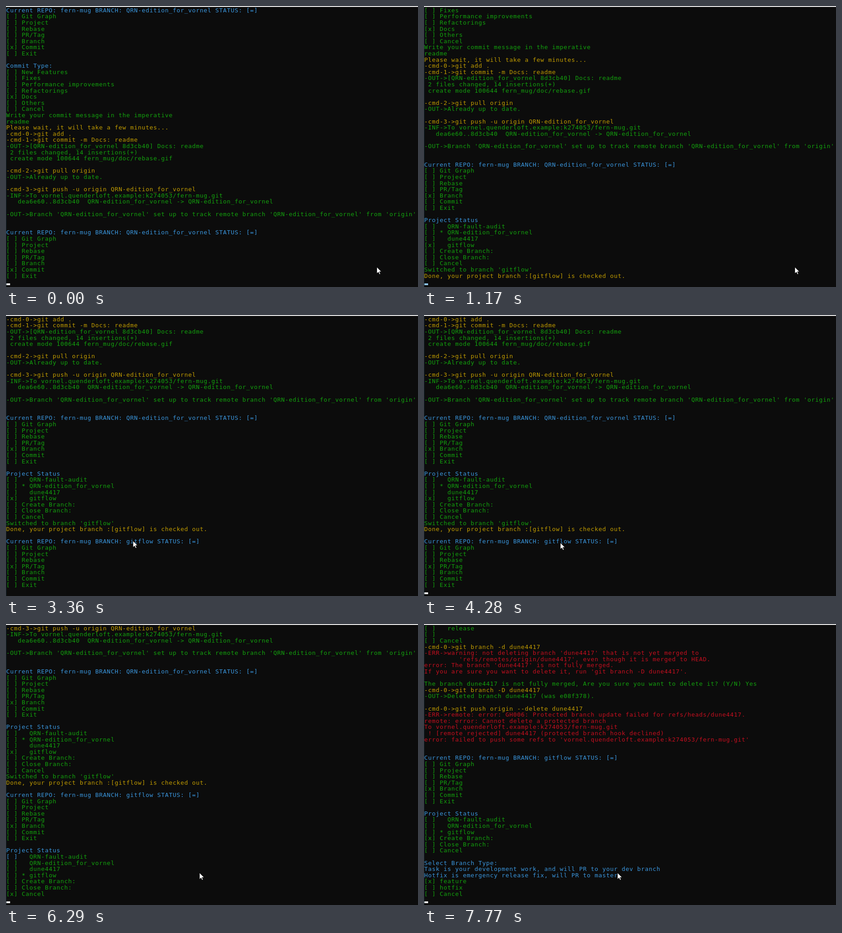
An HTML page for the animation above (8 s loop, 905x619 px).

```html
<!DOCTYPE html>
<html lang="en">
<head>
<meta charset="utf-8">
<title>Terminal session</title>
<style>
  html, body { margin: 0; width: 100%; height: 100%; overflow: hidden; background: #0c0c0c; }
  svg { display: block; }
  text {
    font: 13px "DejaVu Sans Mono", "Noto Sans Mono", monospace;
    letter-spacing: 0.674px;
    font-variant-ligatures: none;
    white-space: pre;
  }
</style>
</head>
<body>
<svg width="905" height="619" viewBox="0 0 905 619">
  <rect width="905" height="619" fill="#0c0c0c"/>
  <rect width="1" height="619" fill="#14242e"/>
  <rect width="905" height="2" fill="#f2f2f2"/>
  <g id="screen"></g>
  <rect id="caret" x="1" y="611" width="8" height="4"/>
  <path id="pointer" d="M0 0V17L4 13.2L6.8 19.2L9.4 18L6.7 12.2H12Z"
        fill="#fff" stroke="#000" stroke-width="1"/>
</svg>
<script>
const LOOP = 8000, ROWS = 44, ROW_HEIGHT = 13.6, BASELINE = 13.8;
const GREEN = '#13a10e', YELLOW = '#c19c00', BLUE = '#3a96dd', RED = '#c50f1f';

const REPO = 'fern-mug';
const MAIN = 'QRN-edition_for_vornel';
const ISSUE = 'QRN-fault-audit';
const OLD = 'dune4417';
const REMOTE = `vornel.quenderloft.example:k274053/${REPO}.git`;

const paint = color => (...texts) => texts.map(text => ({ color, text }));
const green = paint(GREEN), yellow = paint(YELLOW), blue = paint(BLUE), red = paint(RED);
const blank = green('');

// A freshly printed list keeps the title colour on its first bracket.
const options = (items, selected, fresh = false) => items.map((item, i) => ({
  color: GREEN,
  lead: fresh && i === 0 ? BLUE : GREEN,
  text: `[${item.trim() === selected ? 'x' : ' '}] ${item}`
}));

const menu = (branch, selected) => [
  ...blue(`Current REPO: ${REPO} BRANCH: ${branch} STATUS: [=]`),
  ...options(['Git Graph', 'Project', 'Rebase', 'PR/Tag', 'Branch', 'Commit', 'Exit'], selected)
];

const project = (branches, selected, fresh) => [
  ...blank, ...blue('Project Status'),
  ...options([...branches, 'Create Branch:', 'Close Branch:', 'Cancel'], selected, fresh)
];

const commitLog = [
  ...menu(MAIN, 'Commit'), ...blank,
  ...blue('Commit Type:'),
  ...options(['New Features', 'Fixes', 'Performance improvements', 'Refactorings',
    'Docs', 'Others', 'Cancel'], 'Docs'),
  ...green('Write your commit message in the imperative', 'readme'),
  ...yellow('Please wait, it will take a few minutes...',
    '-cmd-0->git add .', '-cmd-1->git commit -m Docs: readme'),
  ...green(`-OUT->[${MAIN} 8d3cb40] Docs: readme`,
    ' 2 files changed, 14 insertions(+)',
    ' create mode 100644 fern_mug/doc/rebase.gif', ''),
  ...yellow('-cmd-2->git pull origin'),
  ...green('-OUT->Already up to date.', ''),
  ...yellow(`-cmd-3->git push -u origin ${MAIN}`),
  ...green(`-INF->To ${REMOTE}`,
    `   dea6e60..8d3cb40  ${MAIN} -> ${MAIN}`, '',
    `-OUT->Branch '${MAIN}' set up to track remote branch '${MAIN}' from 'origin'`, '', '')
];

const branchLog = [...commitLog, ...menu(MAIN, 'Branch')];
const onMain = ['  ' + ISSUE, '* ' + MAIN, '  ' + OLD, '  gitflow'];
const onFlow = ['  ' + ISSUE, '  ' + MAIN, '  ' + OLD, '* gitflow'];

const switchLog = [
  ...branchLog, ...project(onMain, 'gitflow'),
  ...green("Switched to branch 'gitflow'"),
  ...yellow('Done, your project branch :[gitflow] is checked out.')
];
const flowMenu = selected => [...switchLog, ...blank, ...menu('gitflow', selected)];

const closeLog = [
  ...blue('Select a branch to close:'),
  ...options(['  ' + ISSUE, '  ' + MAIN, '  ' + OLD, '  dev', '* gitflow',
    '  master', '  release', '', 'Cancel'], OLD),
  ...yellow(`-cmd-0->git branch -d ${OLD}`),
  ...red(`-ERR->warning: not deleting branch '${OLD}' that is not yet merged to`,
    `         'refs/remotes/origin/${OLD}', even though it is merged to HEAD.`,
    `error: The branch '${OLD}' is not fully merged.`,
    `If you are sure you want to delete it, run 'git branch -D ${OLD}'.`),
  ...green('', `The branch ${OLD} is not fully merged, Are you sure you want to delete it? (Y/N) Yes`),
  ...yellow(`-cmd-0->git branch -D ${OLD}`),
  ...green(`-OUT->Deleted branch ${OLD} (was e08f378).`, ''),
  ...yellow(`-cmd-0->git push origin --delete ${OLD}`),
  ...red(`-ERR->remote: error: GH006: Protected branch update failed for refs/heads/${OLD}.`,
    'remote: error: Cannot delete a protected branch',
    `To ${REMOTE}`,
    ` ! [remote rejected] ${OLD} (protected branch hook declined)`,
    `error: failed to push some refs to '${REMOTE}'`, '', ''),
  ...menu('gitflow', 'Branch'),
  ...project(['  ' + ISSUE, '  ' + MAIN, '* gitflow'], 'Create Branch:')
];

const branchType = (selected, fresh) => [
  ...closeLog, ...blank,
  ...blue('Select Branch Type:',
    'Task is your development work, and will PR to your dev branch',
    'Hotfix is emergency release fix, will PR to master'),
  ...options(['feature', 'hotfix', 'Cancel'], selected, fresh)
];

const scenes = [
  [0, [...commitLog, ...menu(MAIN, 'Commit')]],
  [80, branchLog],
  [250, [...branchLog, ...project(onMain, 'Cancel', true)]],
  [480, [...branchLog, ...project(onMain, 'gitflow')]],
  [1170, switchLog],
  [3360, flowMenu('PR/Tag')],
  [6210, flowMenu('Branch')],
  [6290, [...flowMenu('Branch'), ...project(onFlow, 'Cancel', true)]],
  [6590, closeLog],
  [6760, branchType('Cancel', true)],
  [7540, branchType('hotfix')],
  [7770, branchType('feature')]
];

const caretToggles = [480, 630, 940, 1170, 1800, 2350, 2880, 3130, 3360,
  3890, 4420, 4970, 5520, 6060, 7370, 7540];

const MOVE_START = 3360, MOVE_END = 6290, MOVE_STEP = 76.5;
const pointerPath = [
  [3360, 279, 497.5], [3700, 330, 500], [4120, 268, 502], [4500, 352, 501],
  [4970, 272, 509], [5140, 269.5, 508.5], [5350, 269.5, 508.5],
  [5830, 402, 602], [6200, 425, 548]
];

const screen = document.getElementById('screen');
const caret = document.getElementById('caret');
const pointer = document.getElementById('pointer');

const lineMarkup = ({ color, lead = color, text }, row) =>
  `<text x="0.6" y="${(BASELINE + row * ROW_HEIGHT).toFixed(1)}" fill="${color}">` +
  `<tspan fill="${lead}">${text.slice(0, 3)}</tspan>${text.slice(3)}</text>`;

function pointerAt(t) {
  if (t < MOVE_START) return [814.5, 575];
  const last = pointerPath[pointerPath.length - 1];
  const time = MOVE_START + Math.floor((t - MOVE_START) / MOVE_STEP) * MOVE_STEP;
  if (t >= MOVE_END || time >= last[0]) return last.slice(1);
  const next = pointerPath.findIndex(point => point[0] > time);
  const [t0, x0, y0] = pointerPath[next - 1], [t1, x1, y1] = pointerPath[next];
  const k = (time - t0) / (t1 - t0), ease = k * k * (3 - 2 * k);
  return [x0 + (x1 - x0) * ease, y0 + (y1 - y0) * ease];
}

let shown = null;
function render(t) {
  const lines = scenes.filter(([start]) => start <= t).pop()[1];
  if (lines !== shown) {
    screen.innerHTML = lines.slice(-ROWS).map(lineMarkup).join('');
    shown = lines;
  }
  const toggles = caretToggles.filter(time => time <= t).length;
  caret.setAttribute('visibility', toggles % 2 ? 'hidden' : 'visible');
  caret.setAttribute('fill', t >= 1170 && t < 1800 ? '#8cc4ea' : '#fff');
  pointer.setAttribute('transform', `translate(${pointerAt(t)}) scale(.85)`);
}

const begin = performance.now();
function tick() {
  render((performance.now() - begin) % LOOP);
  requestAnimationFrame(tick);
}
tick();
</script>
</body>
</html>
```
